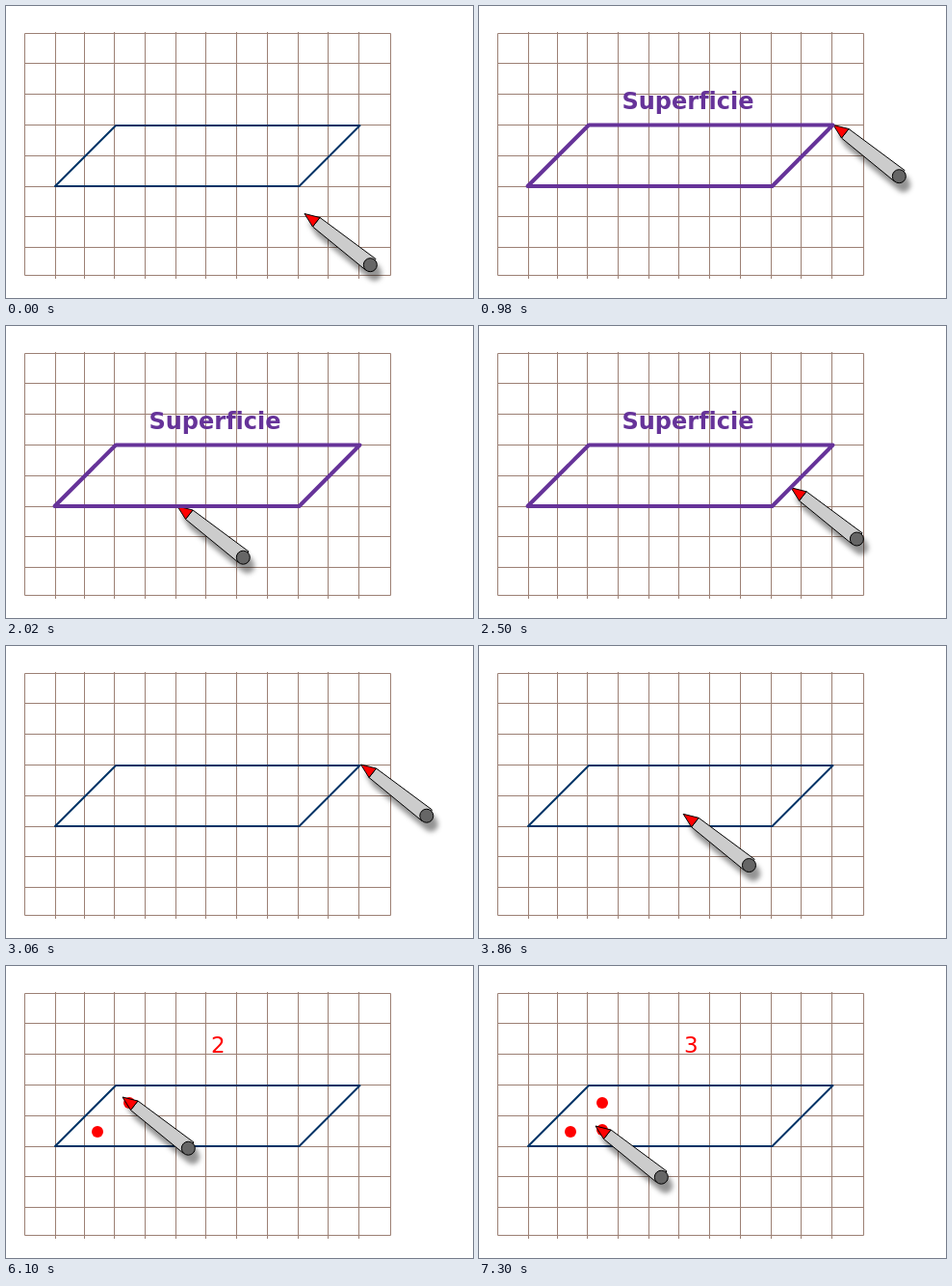
These frames come from a looping animation (485 px wide and 303 px high, 8 s). An HTML page:

```html
<!DOCTYPE html>
<html lang="es">
<head>
<meta charset="utf-8">
<style>
  html, body { margin: 0; width: 100%; height: 100%; overflow: hidden; background: #fff; }
  svg { display: block; }
  text { font: 23px "DejaVu Sans", sans-serif; fill: #f00; }
  #label { font-size: 24px; font-weight: bold; fill: #639; }
</style>
</head>
<body>
<svg width="485" height="303" viewBox="0 0 485 303">
  <filter id="shadow" x="-20%" y="-20%" width="150%" height="160%">
    <feDropShadow dx="4.5" dy="9" stdDeviation="2.8" flood-color="#000" flood-opacity=".42"/>
  </filter>
  <path id="grid" fill="none" stroke="#9c8074"/>
  <path d="M51 187L114 124H367.5L304.5 187Z" fill="none" stroke="#036" stroke-width="2" stroke-linejoin="round"/>
  <g id="dots" fill="#f00"></g>
  <g id="pen" filter="url(#shadow)" stroke="#000" stroke-linejoin="round">
    <path d="M16 4L74 47L63.5 58.5L8.5 13.5Z" fill="#ccc"/>
    <path d="M0 0L16 4L8.5 13.5Z" fill="#f00"/>
    <circle cx="68.3" cy="53.2" r="7" fill="#666"/>
  </g>
  <g id="surface">
    <path d="M50.5 187L114 123.5H367.5L304.5 187Z" fill="none" stroke="#639" stroke-width="4" stroke-linejoin="round"/>
    <text id="label" x="148.5" y="107">Superficie</text>
  </g>
  <text id="count" x="213" y="89.5"></text>
</svg>
<script>
const LOOP = 8000, STEP = 80, OFFSET = 20;
const find = id => document.getElementById(id);
const pen = find('pen'), surface = find('surface'), count = find('count');
const lines = (n, line) => Array.from({ length: n }, (_, i) => line(i)).join('');

// Frame, narrow-margin column, then the even columns and rows
find('grid').setAttribute('d', 'M19.5 28.5H399.5V279.5H19.5Z M51.5 27V283' +
  lines(10, i => `M${Math.floor(81.15 + 31.7 * i) + .5} 27V283`) +
  lines(7, i => `M19 ${Math.floor(59.9 + 31.8 * i) + .5}H400`));

const home = { x: 310, y: 215.5 };
const trace = { from: 980, to: 3060 };
const legs = [
  { from: 420, to: trace.from, x: 368, y: 123.5 },
  { from: trace.from, to: 1460, x: 113, y: 123.5 },
  { from: 1460, to: 1780, x: 51, y: 187 },
  { from: 1780, to: 2260, x: 305, y: 187 },
  { from: 2260, to: trace.to, x: 368.5, y: 123 },
  { from: 3380, to: 4100, x: 134, y: 200 },
  { from: 4100, to: 4660, x: 91.5, y: 172, dot: [95, 172] },
  { from: 5460, to: 6100, x: 121, y: 136, dot: [128, 142] },
  { from: 6820, to: 7300, x: 121, y: 166, dot: [128, 170] }
];
const marks = legs.filter(leg => leg.dot);

function tipAt(time) {
  let { x, y } = home;
  for (const leg of legs) {
    const p = Math.min(1, Math.max(0, (time - leg.from) / (leg.to - leg.from)));
    x += (leg.x - x) * p;
    y += (leg.y - y) * p;
  }
  return [x, y];
}

function draw(now) {
  const time = Math.floor((now % LOOP - OFFSET) / STEP) * STEP + OFFSET;
  const made = marks.filter(mark => time >= mark.to);
  const tracing = time >= trace.from && time < trace.to;
  pen.setAttribute('transform', `translate(${tipAt(time)})`);
  surface.setAttribute('visibility', tracing ? 'visible' : 'hidden');
  find('dots').innerHTML = made.map(({ dot: [x, y] }) => `<circle cx="${x}" cy="${y}" r="6"/>`).join('');
  count.textContent = made.length || '';
}

let start;
function tick(now) {
  start ??= now;
  draw(now - start);
  requestAnimationFrame(tick);
}
draw(0);
requestAnimationFrame(tick);
</script>
</body>
</html>
```
